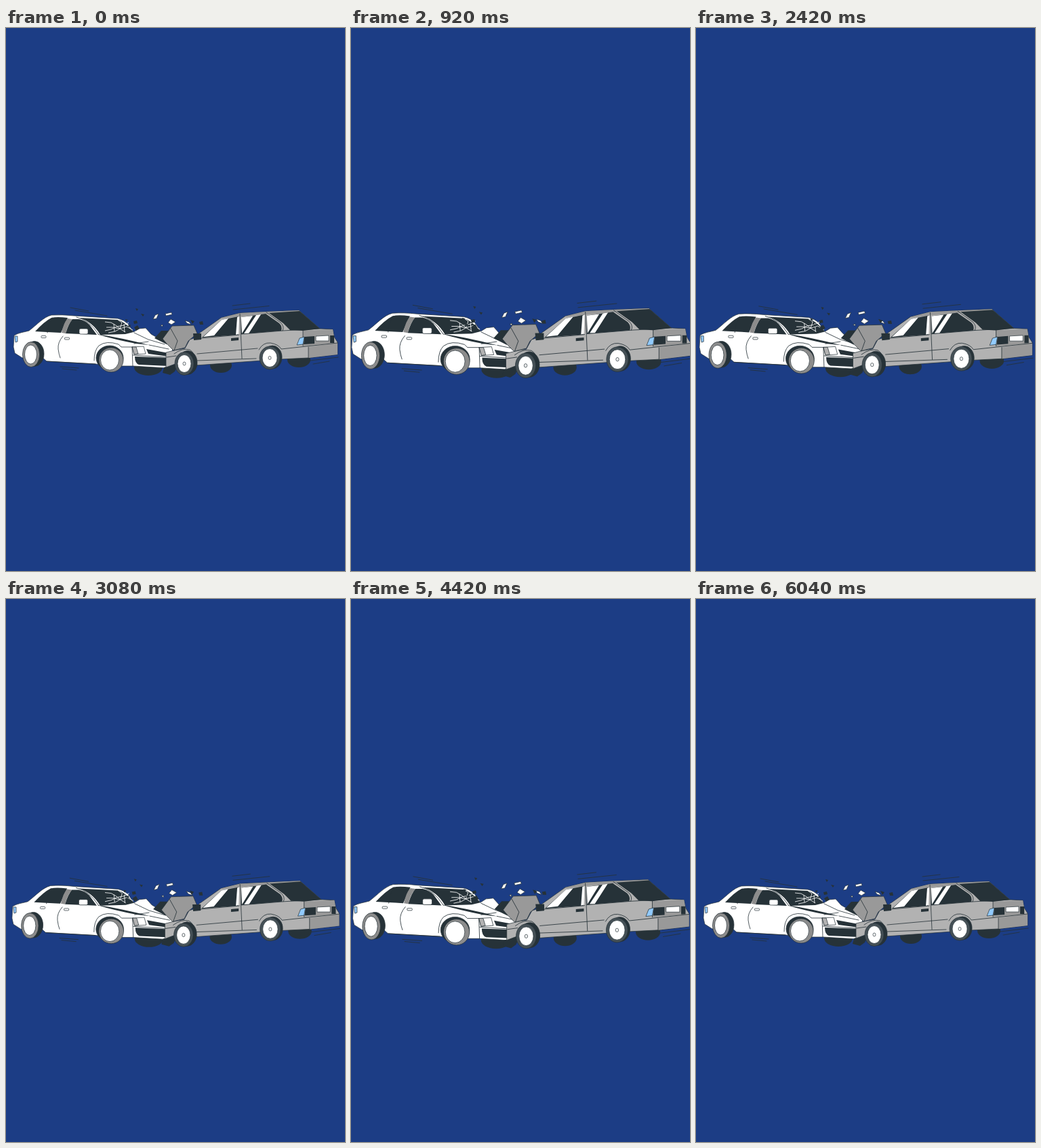
An HTML page for the animation above (6.08 s loop, 500 px wide and 800 px high).

```html
<!DOCTYPE html>
<html lang="en">
<head>
<meta charset="utf-8">
<title>Collision</title>
<style>
  html, body { margin: 0; width: 100%; height: 100%; overflow: hidden; background: #1c3d85; }
  svg { display: block; width: 100vw; height: 100vh; }
  .ink { fill: #263238; }
  .white { fill: #fff; }
  .body { fill: #b2b2b2; }
  .mid { fill: #999; }
  .deep { fill: #8c8c8c; }
  .line { fill: none; stroke: #263238; stroke-width: .8; stroke-linecap: round; stroke-linejoin: round; }
  .edge { stroke: #263238; stroke-width: .7; stroke-linejoin: round; }
  .crack { fill: none; stroke: #fff; stroke-width: .8; stroke-linejoin: round; }
</style>
</head>
<body>
<svg viewBox="0 0 500 800">
  <g id="sedan">
    <path class="line" d="M95 412L122 417M102 416L149 424M80 499L107 501M83 502L104 504"/>
    <ellipse class="ink" cx="210" cy="500" rx="21" ry="12"/>
    <path class="white edge" d="M12 453C18 449 27 448 34 446C46 437 55 426 67 423Q82 422 101 424L165 428Q174 430 180 436L188 448L196 443L206 442L214 451L226 458L239 465L246 473L238 501L187 498L168 498L132 495L60 491L52 484L24 486L13 479L11 470Z"/>
    <path class="ink" d="M43 447Q57 432 67 427Q75 425 91 427L81 449Q60 448 43 447Z"/>
    <path class="deep" d="M82 449Q85 434 91 428L98 429Q91 437 88 450Z"/>
    <path class="ink" d="M88 450Q92 436 98 429L108 429Q117 431 123 437L134 452Z"/>
    <path class="ink" d="M108 427L165 430Q176 433 188 448L176 451L139 452Q128 433 108 427Z"/>
    <path class="line" d="M68 427Q61 438 61 449M104 426Q123 430 137 452M84 454Q76 463 77 473Q78 481 80 486M60 491L132 495"/>
    <path class="crack" d="M146 433L155 434L162 438L168 443L178 440L187 445M146 446L155 444L163 440L174 438L181 434M148 441L157 441L168 443L176 448M151 449L161 447L168 443L171 434L165 430M159 436L160 447M174 436L175 448"/>
    <path class="ink" d="M134 451Q168 456 211 467L192 465Q160 459 134 451Z"/>
    <path class="line" d="M211 467L240 473M189 449L210 459L234 466M189 465L210 462M130 490Q130 475 137 468Q148 460 166 466L170 470L187 470"/>
    <rect class="white edge" x="108" y="443" width="13" height="8" rx="2"/>
    <rect class="white edge" x="52" y="453.500" width="7" height="3" rx="1"/>
    <rect class="white edge" x="86.500" y="456" width="7" height="3" rx="1"/>
    <path d="M13 454L17 454L17 462L14 463Z" fill="#92cbff" class="edge"/>
    <path class="white edge" d="M186 470L203 469L206 480L189 481Z"/>
    <path class="body edge" d="M186 470L192 470L195 480L189 481Z"/>
    <path class="ink" d="M207 473L240 479L240 484L210 480ZM190 484L240 486L240 498L196 496Q190 494 190 484Z"/>
    <path class="line" d="M186 470L187 498M187 482L236 485"/>
    <g id="sedanWheels"></g>
    <path class="white edge" d="M217 429L220 423L225 421L222 428ZM235 421L244 419L245 422L236 424ZM239 434L243 429L250 433L244 437ZM228 438L231 437L231 440ZM264 431L270 433L273 437L267 435Z"/>
  </g>
  <g id="hatch">
    <path class="line" d="M334 409L360 406M335 415L388 409.500M449 490L490 485M453 495L477 491"/>
    <path class="ink" d="M191 413L195 414L193 417ZM199 421L204 422L202 425ZM176 429L180 430L177 433ZM188 432L193 431L194 435L189 436ZM179 439L184 437L183 441ZM189 441L194 438L197 443L192 446ZM272 430L278 432L275 436ZM285 433L290 432L291 437L286 437Z"/>
    <ellipse class="ink" cx="317" cy="497" rx="16" ry="11"/>
    <ellipse class="ink" cx="432" cy="489" rx="17" ry="11"/>
    <path class="ink" d="M233 500L254 494L249 506L242 511L231 508Z"/>
    <path class="ink" d="M219 457L229 446L243 446L246 463L237 466Z"/>
    <path class="body edge" d="M277 457L286 449L317 427L345 420L384 418L432 416L463 443L482 444L484 455L489 463L489 481L446 486L405 488L280 497L252 494L236 500L236 478L248 475L264 472L271 459Z"/>
    <path class="mid" d="M317 427L345 420L384 418L432 416L434 418L388 421L345 425L319 428Z"/>
    <path class="mid" d="M438 446L482 444L484 455L485 464L438 469ZM446 470L489 464L489 481L446 486Z"/>
    <path class="mid edge" d="M231 458L245 439L277 438L282 450L269 461L264 471L247 475L237 465Z"/>
    <path class="line" d="M243 443L253 461L248 475"/>
    <path class="ink" d="M289 456L318 430L343 425L342 452ZM347 426L383 421L403 435Q408 440 406 446L347 451ZM388 420L433 417L463 443L438 446L419 445L409 435Z"/>
    <path class="white" d="M291 455L318 430L328 428L307 453ZM347 426L364 424L348 450ZM351 450L369 423L376 422L358 450ZM341 426L344 425L343 451L339 452Z"/>
    <path class="line" d="M345 421L348 487M384 419L405 434Q411 440 408 446L347 451M288 457L344 452M282 480L371 472M282 490L369 487M237 485L251 483M373 474Q379 463 390 464Q402 466 406 473L489 464M248 480Q260 471 271 474Q279 478 282 497M408 446L463 443M438 446L438 468M446 470L446 486"/>
    <path class="ink" d="M332 457L343 456L343 460L332 461ZM276 450L288 450L288 459L277 460ZM440 455L455 454L455 465L439 466ZM478 453L484 453L484 464L478 464Z"/>
    <path class="edge" fill="#92cbff" d="M429 467L433 457L440 455L438 466Z"/>
    <path class="white edge" d="M457 454L476 453L476 461L457 461Z"/>
    <g id="hatchWheels"></g>
  </g>
</svg>
<script>
const NS = 'http://www.w3.org/2000/svg';
const LOOP = 6080;
const GROWTH = 0.1;
const INK = '#263238';
const RIM = '#8c8c8c';

// [time, amount of swell]
const swell = [
  [0, 0], [300, .22], [630, .56], [920, .75], [1200, .85], [1500, .83], [1880, .71],
  [2420, .45], [3130, .14], [3480, .03], [3750, .08], [4080, .3], [4420, .63],
  [4815, .85], [5210, .63], [5630, .26], [5900, .06], [LOOP, 0]
];

const byId = id => document.getElementById(id);

function ellipse(parent, cx, cy, rx, ry, fill) {
  const el = document.createElementNS(NS, 'ellipse');
  const attrs = { cx, cy, rx, ry, fill, stroke: INK, 'stroke-width': .7 };
  for (const key in attrs) el.setAttribute(key, attrs[key]);
  parent.append(el);
}

function wheel(parent, x, y, rx, ry, tire, hub) {
  const [dx, dy, tx, ty, fill] = tire;
  ellipse(parent, x + dx, y + dy, tx, ty, fill);
  ellipse(parent, x, y, rx, ry, '#fff');
  if (hub) ellipse(parent, x, y, 2, 2.5, '#fff');
}

const sedanWheels = byId('sedanWheels');
const hatchWheels = byId('hatchWheels');
ellipse(sedanWheels, 42, 480, 14, 18.5, INK);
ellipse(sedanWheels, 153, 486, 20, 18, INK);
wheel(sedanWheels, 36.5, 481, 9, 14, [.5, 0, 12.5, 18.5, RIM]);
wheel(sedanWheels, 153, 489, 13.5, 15, [2, 0, 18, 18, RIM]);
ellipse(hatchWheels, 268, 493, 14, 17.5, INK);
ellipse(hatchWheels, 393, 485, 14, 17, INK);
wheel(hatchWheels, 263, 494.5, 10, 13, [0, 0, 14, 17, '#455056'], true);
wheel(hatchWheels, 389, 486, 11, 13.5, [0, 0, 15, 17, '#455056'], true);

function slope(i) {
  if (i === 0 || i === swell.length - 1) return 0;
  const [t0, v0] = swell[i - 1];
  const [t1, v1] = swell[i + 1];
  return (v1 - v0) / (t1 - t0);
}

function swellAt(time) {
  const i = Math.max(0, swell.findIndex(key => key[0] > time) - 1);
  const [t0, v0] = swell[i];
  const [t1, v1] = swell[i + 1];
  const span = t1 - t0;
  const u = (time - t0) / span;
  const ease = u * u * (3 - 2 * u);
  return v0 + (v1 - v0) * ease
    + span * u * (1 - u) * (slope(i) * (1 - u) - slope(i + 1) * u);
}

function scaleAbout(el, x, y, scale) {
  el.setAttribute('transform', `translate(${x} ${y}) scale(${scale}) translate(${-x} ${-y})`);
}

const sedan = byId('sedan');
const hatch = byId('hatch');
const start = performance.now();

function draw(now) {
  const time = Math.max(0, now - start) % LOOP;
  const scale = 1 + GROWTH * swellAt(time);
  scaleAbout(sedan, 145, 461, scale);
  scaleAbout(hatch, 336, 457, scale);
  requestAnimationFrame(draw);
}
draw(start);
</script>
</body>
</html>
```
